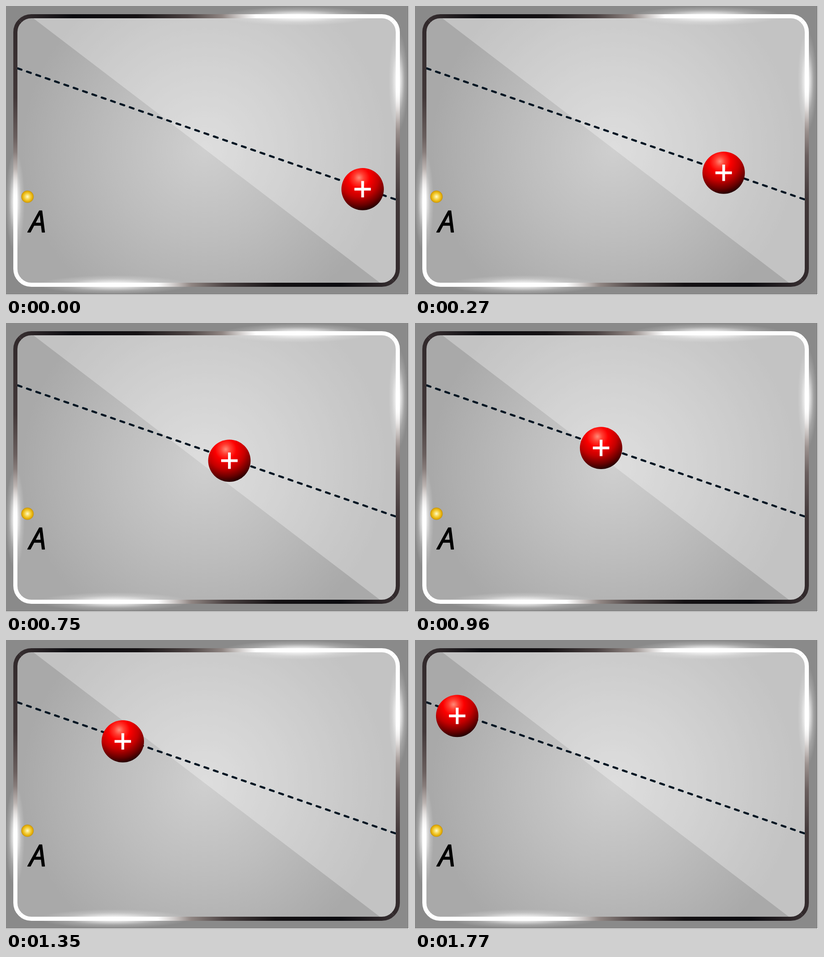
An HTML page that plays this animation: 882x635 px, repeating every 1.8 s.

```html
<!DOCTYPE html>
<html lang="en">
<head>
<meta charset="utf-8">
<title>Charge passing point A</title>
<style>
  html, body { margin: 0; width: 100%; height: 100%; overflow: hidden; background: #fff; }
  svg { display: block; }
  .frame path { fill: none; stroke-width: 9; }
  .label { font: italic 66px "Open Sans", "Noto Sans", sans-serif; stroke: #000; stroke-width: 1.5; stroke-linejoin: round; }
</style>
</head>
<body>
<svg width="882" height="635" viewBox="0 0 882 635">
  <defs>
    <radialGradient id="panel" gradientUnits="userSpaceOnUse" cx="435" cy="315" r="400">
      <stop offset="0" stop-color="#cfcfcf"/>
      <stop offset=".5" stop-color="#bdbdbd"/>
      <stop offset="1" stop-color="#a9a9a9"/>
    </radialGradient>
    <radialGradient id="red" gradientUnits="userSpaceOnUse" cx="-8" cy="-25" r="73">
      <stop offset="0" stop-color="#ff8a78"/>
      <stop offset=".15" stop-color="#ff3c30"/>
      <stop offset=".32" stop-color="#fc0000"/>
      <stop offset=".58" stop-color="#c40000"/>
      <stop offset=".83" stop-color="#680000"/>
      <stop offset="1" stop-color="#1e0000"/>
    </radialGradient>
    <radialGradient id="gold">
      <stop offset="0" stop-color="#fffbd0"/>
      <stop offset=".3" stop-color="#f8e070"/>
      <stop offset=".65" stop-color="#efc01c"/>
      <stop offset=".9" stop-color="#dba406"/>
      <stop offset="1" stop-color="#b58a1c"/>
    </radialGradient>
    <radialGradient id="glow">
      <stop offset="0" stop-color="#fff"/>
      <stop offset=".3" stop-color="#fff" stop-opacity=".7"/>
      <stop offset=".65" stop-color="#fff" stop-opacity=".22"/>
      <stop offset="1" stop-color="#fff" stop-opacity="0"/>
    </radialGradient>
    <linearGradient id="metal">
      <stop offset="0" stop-color="#3a3133"/>
      <stop offset=".15" stop-color="#0b0b0f"/>
      <stop offset=".32" stop-color="#151214"/>
      <stop offset=".45" stop-color="#4a4141"/>
      <stop offset=".54" stop-color="#8f8582"/>
      <stop offset=".63" stop-color="#fff"/>
    </linearGradient>
    <linearGradient id="side">
      <stop offset="0" stop-color="#fff"/>
      <stop offset=".28" stop-color="#fff"/>
      <stop offset=".4" stop-color="#a89e9b"/>
      <stop offset=".52" stop-color="#6a5f5e"/>
      <stop offset=".68" stop-color="#423839"/>
      <stop offset="1" stop-color="#30282a"/>
    </linearGradient>
    <linearGradient id="top" href="#metal" gradientUnits="userSpaceOnUse" x1="20" y1="0" x2="858" y2="0"/>
    <linearGradient id="bottom" href="#metal" gradientUnits="userSpaceOnUse" x1="858" y1="0" x2="20" y2="0"/>
    <linearGradient id="right" href="#side" gradientUnits="userSpaceOnUse" x1="0" y1="22" x2="0" y2="613"/>
    <linearGradient id="left" href="#side" gradientUnits="userSpaceOnUse" x1="0" y1="580" x2="0" y2="22"/>
  </defs>

  <rect width="881" height="634" fill="#8a8a8a"/>
  <rect x="20.5" y="22.5" width="837" height="590" rx="35" fill="url(#panel)"/>
  <path d="M54 22.5H822.5A35 35 0 0 1 857.5 57.5V577.5A35 35 0 0 1 824 612.5Z" fill="#fff" opacity=".3"/>
  <path d="M25.5 137L852.5 425" stroke="#001522" stroke-width="4.6" stroke-linecap="round" stroke-dasharray="8.8 12.85"/>

  <g class="frame">
    <path stroke="url(#top)" d="M30.75 32.75A35 35 0 0 1 55.5 22.5H822.5A35 35 0 0 1 847.25 32.75"/>
    <path stroke="url(#right)" d="M847.25 32.75A35 35 0 0 1 857.5 57.5V577.5A35 35 0 0 1 847.25 602.25"/>
    <path stroke="url(#bottom)" d="M847.25 602.25A35 35 0 0 1 822.5 612.5H55.5A35 35 0 0 1 30.75 602.25"/>
    <path stroke="url(#left)" d="M30.75 602.25A35 35 0 0 1 20.5 577.5V57.5A35 35 0 0 1 30.75 32.75"/>
  </g>
  <g fill="url(#glow)">
    <ellipse cx="640" cy="22" rx="165" ry="21"/>
    <ellipse cx="236" cy="612.5" rx="165" ry="21"/>
    <ellipse cx="858.5" cy="165" rx="21" ry="110"/>
    <ellipse cx="20" cy="430" rx="21" ry="110"/>
  </g>

  <circle cx="47" cy="419" r="13.6" fill="url(#gold)"/>
  <text class="label" x="51" y="497">A</text>

  <g id="ball">
    <circle r="46.4" fill="url(#red)"/>
    <path d="M-18 0H18M0 -18V18" stroke="#fff" stroke-width="6"/>
  </g>
</svg>
<script>
  const LOOP = 1800, STEP = 30;
  const ball = document.getElementById("ball");

  function draw() {
    const t = Math.floor(performance.now() % LOOP / STEP) * STEP;
    const x = 780.5 - 0.3888 * t, y = 402.4 - 0.1331 * t;
    ball.setAttribute("transform", `translate(${x} ${y})`);
    requestAnimationFrame(draw);
  }
  draw();
</script>
</body>
</html>
```
